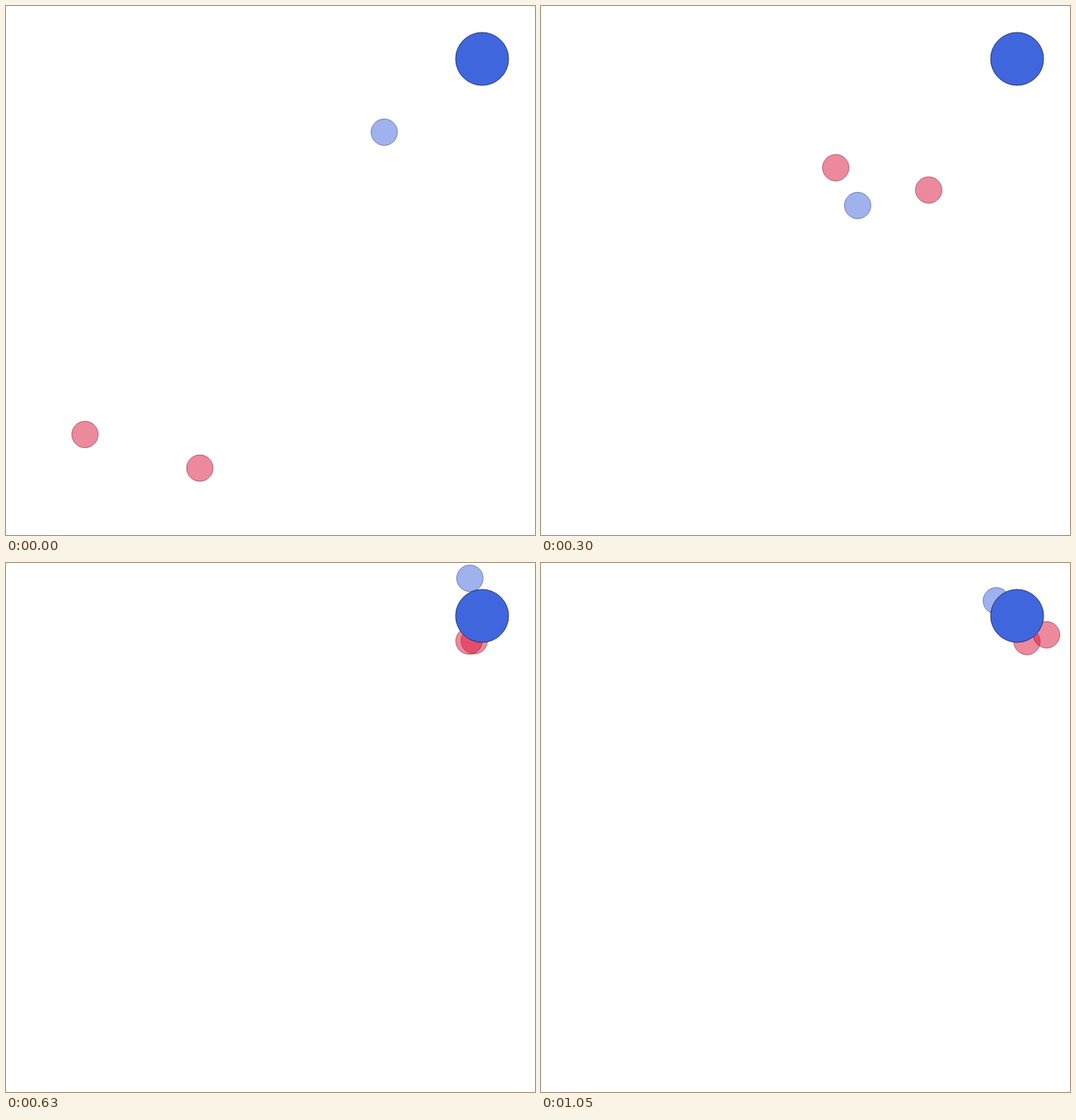
An HTML page with a canvas that plays this animation: 700x700 px, repeating every 1.08 s.

```html
<!DOCTYPE html>
<html lang="en">
<head>
<meta charset="utf-8">
<title>Agents circling a landmark</title>
<style>
html, body { margin: 0; width: 100%; height: 100%; overflow: hidden; background: #fff; }
canvas { display: block; }
</style>
</head>
<body>
<canvas id="stage" width="700" height="700"></canvas>
<script>
const ctx = document.getElementById("stage").getContext("2d");
const STEP = 30, STEPS = 36, TURN = 2 * Math.PI;
const CRIMSON = [220, 20, 60], BLUE = [64, 102, 222];
const goal = { x: 630, y: 70 };

// Agents glide through the first points, then circle the goal through the rest.
const times = [0, 6, 10, 14, 18, 25, 35], arrival = 4;
const agents = [
  { color: CRIMSON, spin: 0.42, points: [
    [104.5, 567], [270, 350.5], [390, 214], [545, 119.5], [658, 87], [598, 52], [643, 104]] },
  { color: CRIMSON, spin: 0.79, points: [
    [256.5, 611.5], [383, 370], [513, 243.5], [624.5, 103.5], [672, 57.5], [643, 44], [669, 95]] },
  { color: BLUE, spin: -0.95, points: [
    [500.5, 167], [356, 300], [419, 264], [539.5, 200.5], [652.5, 142.5], [650.5, 74], [602.5, 50]] }
];

function slope(points, i, axis) {
  const a = Math.max(i - 1, 0), b = Math.min(i + 1, arrival);
  return (points[b][axis] - points[a][axis]) / (times[b] - times[a]);
}

// Cubic Hermite curve between points i and i + 1
function glide(points, i, u, axis) {
  const v = 1 - u, span = times[i + 1] - times[i];
  return v * v * (1 + 2 * u) * points[i][axis] + u * u * (3 - 2 * u) * points[i + 1][axis] +
    span * u * v * (v * slope(points, i, axis) - u * slope(points, i + 1, axis));
}

function polar([x, y]) {
  return { r: Math.hypot(x - goal.x, y - goal.y), angle: Math.atan2(y - goal.y, x - goal.x) };
}

// Spiral between points i and i + 1, with the whole turns closest to the spin
function orbit({ points, spin }, i, u) {
  const a = polar(points[i]), b = polar(points[i + 1]);
  const arc = b.angle - a.angle;
  const turns = Math.round((spin * (times[i + 1] - times[i]) - arc) / TURN);
  const r = a.r + (b.r - a.r) * u, angle = a.angle + (arc + turns * TURN) * u;
  return [goal.x + r * Math.cos(angle), goal.y + r * Math.sin(angle)];
}

function position(agent, t) {
  let i = 0;
  while (i < times.length - 2 && t >= times[i + 1]) i++;
  const u = (t - times[i]) / (times[i + 1] - times[i]);
  return i < arrival ? [0, 1].map(axis => glide(agent.points, i, u, axis)) : orbit(agent, i, u);
}

function disc([x, y], r, color, alpha) {
  ctx.beginPath();
  ctx.arc(x, y, r, 0, TURN);
  ctx.fillStyle = `rgba(${color},${alpha})`;
  ctx.fill();
  ctx.strokeStyle = `rgba(${color.map(c => c >> 1)},${alpha})`;
  ctx.lineWidth = 1;
  ctx.stroke();
}

function draw(step) {
  ctx.fillStyle = "#fff";
  ctx.fillRect(0, 0, 700, 700);
  for (const agent of agents) disc(position(agent, step), 17.5, agent.color, 0.5);
  disc([goal.x, goal.y], 35, BLUE, 1);
}

const start = performance.now();
function tick() {
  draw(Math.floor((performance.now() - start) / STEP) % STEPS);
  requestAnimationFrame(tick);
}
tick();
</script>
</body>
</html>
```
